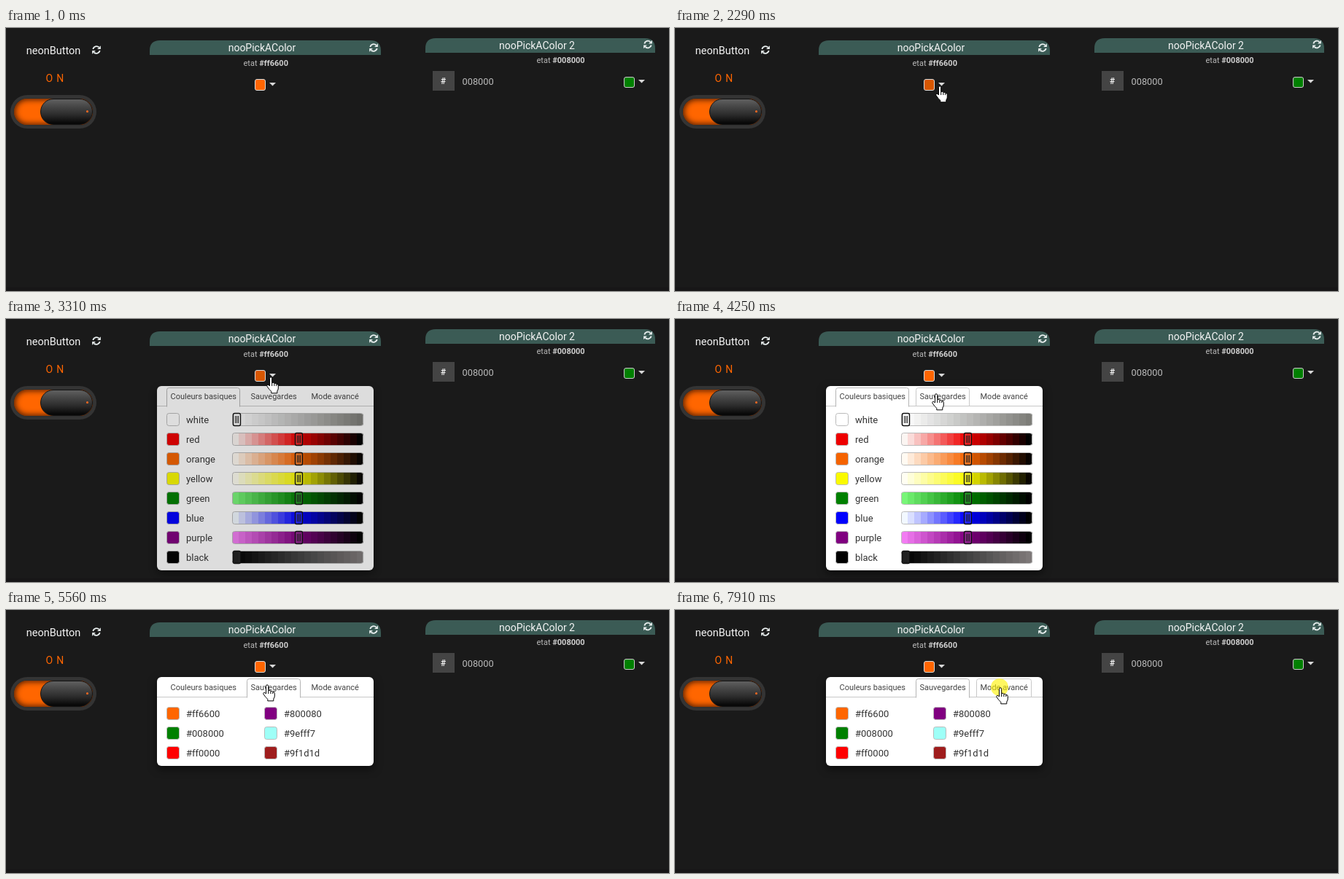
An HTML page for the animation above (8000 ms loop, 909 px wide and 361 px high).

```html
<!DOCTYPE html>
<html lang="fr">
<head>
<meta charset="utf-8">
<title>Color picker widgets</title>
<style>
  html, body { margin: 0; width: 100%; height: 100%; overflow: hidden; background: #1a1a1a; }
  svg { position: absolute; left: 0; top: 0; display: block; font-family: Roboto, sans-serif; }
  .track, .well, .knob { position: absolute; box-sizing: border-box; }
  .track { left: 6px; top: 92px; width: 118px; height: 46px; border-radius: 23px; background: #343434; }
  .well { left: 5px; top: 5px; width: 108px; height: 36px; border-radius: 18px;
    background: #ff6600; box-shadow: inset 0 0 8px 1px #3a1500, 0 0 1px #111; }
  .knob { left: 41px; top: 5px; width: 72px; height: 36px; border-radius: 18px; border: 1px solid #151515;
    background: linear-gradient(#606060, #474747 28%, #2d2d2d 60%, #080808 95%); }
  .knob::after { content: ""; position: absolute; left: 62px; top: 15px; width: 3px; height: 3px;
    border-radius: 50%; background: #ff6a20; }
  .title { font-size: 14px; fill: #f4f4f4; text-anchor: middle; }
  .state { font-size: 11px; fill: #b8b8b8; }
  .state tspan { font-weight: 700; fill: #d0d0d0; }
  .head { fill: #3b5b55; }
  .light { fill: #d8d8d8; }
  #popup { filter: drop-shadow(0 4px 6px rgba(0, 0, 0, .55)); }
  .tab { font-size: 11px; fill: #444; }
  .label { font-size: 13px; fill: #333; }
  .edge { fill: none; stroke: #bbb; }
  .handle { fill: rgba(255, 255, 255, .12); stroke: #111; stroke-width: 1.4; }
  .grip { fill: none; stroke: #222; stroke-width: 1; }
  .pointer { fill: #fff; stroke: #000; stroke-linejoin: round; }
</style>
</head>
<body>
<div class="track"><div class="well"></div><div class="knob"></div></div>
<svg width="909" height="361" viewBox="0 0 909 361">
  <defs>
    <g id="half">
      <path d="M-4.7 -1A4.9 4.9 0 0 1 3.4 -3.5" fill="none" stroke="#e8eeee" stroke-width="1.9"/>
      <path d="M5.9 -5.8V-1H1.1Z" fill="#e8eeee"/>
    </g>
    <g id="refresh"><use href="#half"/><use href="#half" transform="rotate(180)"/></g>
    <path id="caret" class="light" d="M-4.5 0H4.5L0 4.5Z"/>
  </defs>
  <rect y="356" width="909" height="5" fill="#171617"/>

  <text x="65" y="36" class="title" style="font-size:14.5px">neonButton</text>
  <use href="#refresh" x="124" y="30"/>
  <text x="54.5" y="74" font-size="14" letter-spacing="5" fill="#ff6600">ON</text>

  <path class="head" d="M197 37V31Q197 17 211 17H500Q514 17 514 31V37Z"/>
  <text x="351" y="32" class="title">nooPickAColor</text>
  <use href="#refresh" x="504" y="27"/>
  <text x="325.5" y="52" class="state">etat <tspan>#ff6600</tspan></text>
  <rect id="swatch" x="341.5" y="70.5" width="14" height="15" rx="2.5" stroke="#ddd"/>
  <use href="#caret" x="365.5" y="75"/>

  <path class="head" d="M575 34V28Q575 14 589 14H876Q890 14 890 28V34Z"/>
  <text x="728" y="28.5" class="title">nooPickAColor 2</text>
  <use href="#refresh" x="880" y="22.5"/>
  <text x="727.5" y="48" class="state">etat <tspan>#008000</tspan></text>
  <rect x="585" y="59" width="30" height="27" fill="#444"/>
  <text x="599.5" y="77" font-size="12" font-weight="700" fill="#eee" text-anchor="middle">#</text>
  <text x="625.5" y="78" font-size="12.8" fill="#bbb">008000</text>
  <rect x="847.5" y="67.5" width="14" height="14" rx="2.5" fill="#008000" stroke="#ccc"/>
  <use href="#caret" x="871.5" y="71"/>

  <g id="popup">
    <rect id="sheet" x="207" y="92" width="297" rx="6" fill="#fff"/>
    <path d="M207 119.5H504" stroke="#c8c8c8"/>
    <g id="frames"></g>
    <text x="225.5" y="110" class="tab">Couleurs basiques</text>
    <text x="335.5" y="110" class="tab">Sauvegardes</text>
    <text x="418.5" y="110" class="tab">Mode avancé</text>
    <g id="basic"></g>
    <g id="saved"></g>
  </g>

  <g id="cursor">
    <circle id="click" r="12" fill="#fff200" fill-opacity=".62"/>
    <path id="arrow" class="pointer" d="M.5 .5V16.5L4.2 13 6.6 18.5 8.9 17.5 6.6 12.2H11.5Z"/>
    <path id="hand" class="pointer" d="M-.5 13V2.4a1.6 1.6 0 0 1 3.2 0V8.4q2.9-.6 3.2.9q2.5-.5 2.9 1q2.5-.1 2.5 2V16q0 2-1.5 4V22.8H1.8V20.4Q-1 18 -3.8 13.9q-1-2 .4-2.6q1.5-.3 2.9 1.7ZM2.7 8.4V13M5.9 9.3V13M8.8 10.3V13"/>
  </g>
</svg>
<script>
const LOOP = 8000, OPEN = 3150, SAVED = 5560;
const el = id => document.getElementById(id);
const show = (node, on) => node.setAttribute('visibility', on ? 'inherit' : 'hidden');

// name, tint at the left, base colour, shade at the right
const basics = [
  ['white', '#ffffff', '#bfc0be', '#7d7d78'],
  ['red', '#fbf5f2', '#ee0000', '#000000'],
  ['orange', '#fffaf2', '#f56300', '#080300'],
  ['yellow', '#fffef2', '#fafa00', '#080500'],
  ['green', '#78f578', '#008000', '#000000'],
  ['blue', '#f2f8ff', '#0000ff', '#000000'],
  ['purple', '#f27cf2', '#800080', '#000000'],
  ['black', '#000000', '#404040', '#7d7878']
];
const savedColors = ['#ff6600', '#008000', '#ff0000', '#800080', '#9efff7', '#9f1d1d'];

const channels = hex => [1, 3, 5].map(i => parseInt(hex.slice(i, i + 2), 16));
const mix = (a, b, p) => {
  const to = channels(b);
  return `rgb(${channels(a).map((v, i) => Math.round(v + (to[i] - v) * p))})`;
};

const entry = (x, y, color, name) =>
  `<rect x="${x + .5}" y="${y - 8.5}" width="17" height="17" rx="3" fill="${color}" stroke="#bbb"/>
   <text x="${x + 27}" y="${y + 5}" class="label">${name}</text>`;

function slider(y, left, mid, right, handle) {
  const count = 20, width = 180 / count;
  let bands = '';
  for (let i = 0; i < count; i++) {
    const p = i / (count - 1) * 2;
    const color = p < 1 ? mix(left, mid, p) : mix(mid, right, p - 1);
    bands += `<rect x="${310 + i * width}" y="${y - 8}" width="${width + .3}" height="16" fill="${color}"/>`;
  }
  return `<g style="clip-path:inset(0 round 3px)">${bands}</g>
    <rect x="310.5" y="${y - 8.5}" width="179" height="17" rx="3" class="edge"/>
    <rect x="${handle - 4.5}" y="${y - 8.5}" width="10" height="17" rx="2" class="handle"/>
    <path d="M${handle - 1.5} ${y - 5}v10m2 0v-10m2 0v10" class="grip"/>`;
}

el('basic').innerHTML = basics.map(([name, left, mid, right], i) => {
  const y = 138 + 27 * i, gray = name === 'white' || name === 'black';
  return entry(220, y, gray ? left : mid, name) + slider(y, left, mid, right, gray ? 316 : 401);
}).join('');
el('saved').innerHTML = savedColors.map((color, i) =>
  entry(i < 3 ? 220 : 354, 142 + 27 * (i % 3), color, color)).join('');

const tabs = [[220, 321], [330, 404], [413, 489]];
const tabFrames = tabs.map(([left, right]) => {
  const path = document.createElementNS('http://www.w3.org/2000/svg', 'path');
  path.shape = bottom => `M${left + .5} ${bottom}V97.5q0-3 3-3H${right - 3.5}q3 0 3 3V${bottom}`;
  path.setAttribute('fill', '#fff');
  return el('frames').appendChild(path);
});

// start, number of positions, ms per position, from, to, ease-out power
const legs = [
  [1350, 11, 78, 765, 328, 362, 85, 1.6],
  [2210, 2, 80, 362, 82, 362, 79, 1],
  [3850, 6, 80, 362, 81, 357, 102, 1],
  [6570, 8, 77, 359, 103, 422, 104, 1],
  [7190, 4, 80, 428, 104, 445, 106, 1]
];
const clicks = [[2990, OPEN], [5420, SAVED], [7910, LOOP]];
const fade = [.2, .54, .85, 1];

function position(t) {
  const leg = legs.filter(l => l[0] <= t).pop();
  if (!leg) return null;
  const [start, count, step, x0, y0, x1, y1, power] = leg;
  const i = Math.min(count - 1, Math.floor((t - start) / step));
  const p = 1 - (1 - i / (count - 1)) ** power;
  return [Math.round(x0 + (x1 - x0) * p), Math.round(y0 + (y1 - y0) * p)];
}

function draw(t) {
  const pos = position(t), open = t >= OPEN, saved = t >= SAVED;
  const [x, y] = pos || [-50, -50];
  const onButton = x >= 335 && x <= 376 && y >= 68 && y <= 88;
  const onTab = open && y >= 94 && y < 120 ? tabs.findIndex(([l, r]) => x >= l && x <= r) : -1;

  el('swatch').setAttribute('fill', onButton ? '#d85700' : '#ff6600');
  show(el('cursor'), pos);
  el('cursor').setAttribute('transform', `translate(${x} ${y})`);
  show(el('hand'), onButton || onTab >= 0);
  show(el('arrow'), !onButton && onTab < 0);
  show(el('click'), clicks.some(([from, to]) => t >= from && t < to));

  show(el('popup'), open);
  if (!open) return;
  el('popup').setAttribute('opacity', fade[Math.min(3, Math.floor((t - OPEN) / 80))]);
  el('sheet').setAttribute('height', saved ? 122 : 253);
  show(el('basic'), !saved);
  show(el('saved'), saved);
  tabFrames.forEach((path, i) => {
    const active = i === (saved ? 1 : 0);
    show(path, active || i === onTab);
    path.setAttribute('d', path.shape(active ? 120.5 : 119));
    path.setAttribute('stroke', active ? '#b4b4b4' : '#c8c8c8');
  });
}

const begin = performance.now();
function tick() {
  draw((performance.now() - begin) % LOOP);
  requestAnimationFrame(tick);
}
tick();
</script>
</body>
</html>
```
